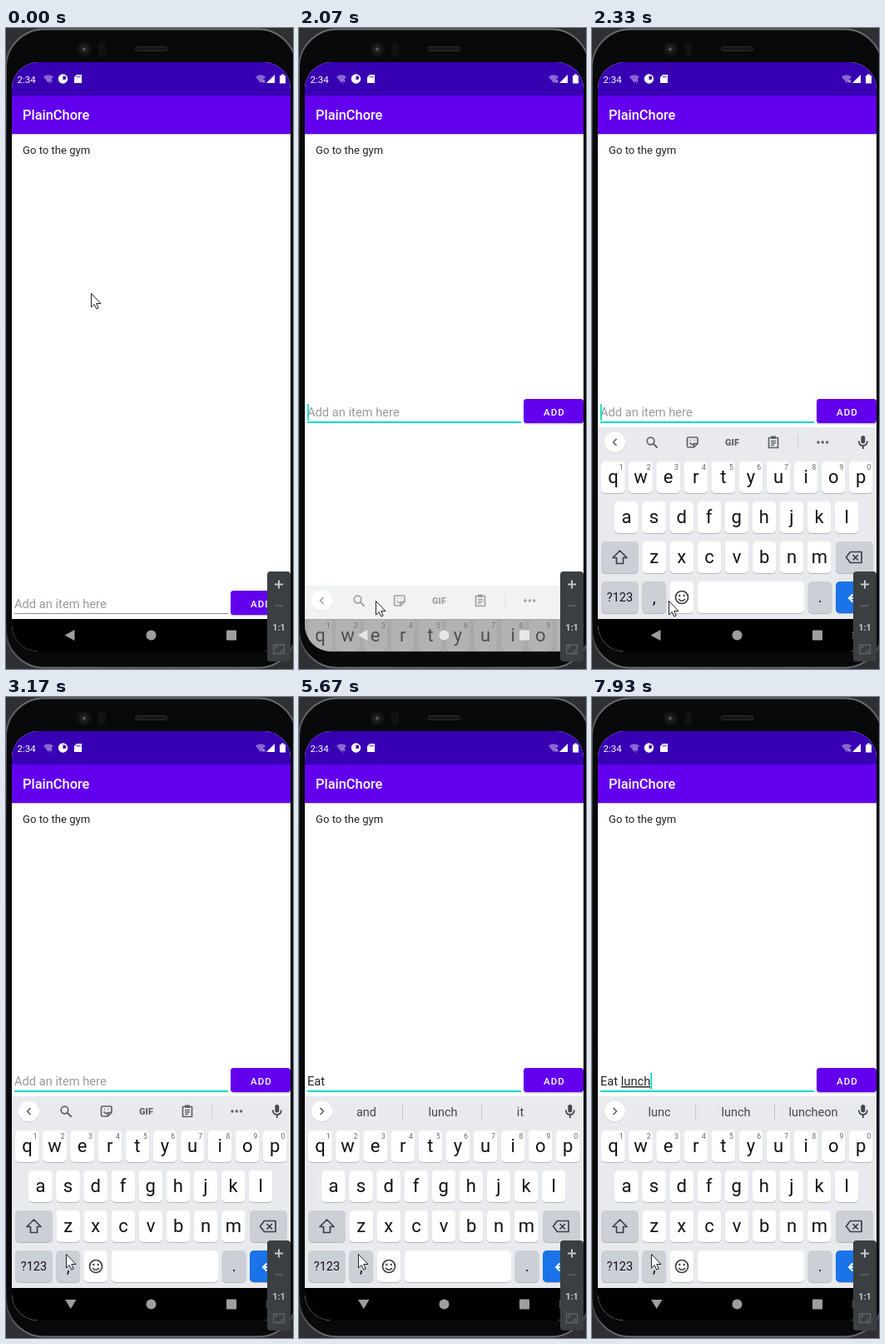
Recreate the animation shown at these times as an HTML page. Size 345 by 769 pixels, loop 8000 ms.

```html
<!DOCTYPE html>
<html lang="en">
<head>
<meta charset="utf-8">
<title>To-do list on a phone</title>
<style>
html, body { margin: 0; width: 100%; height: 100%; overflow: hidden; background: #2e3033; }
svg { display: block; width: 100%; height: 100%; }
text { font-family: Roboto, "Open Sans", sans-serif; white-space: pre; }
.mid { text-anchor: middle; }
.med { font-weight: 500; }
.line { fill: none; stroke: #5f6368; stroke-width: 1.7; stroke-linejoin: round; }
.dark { stroke: #3c4043; }
</style>
</head>
<body>
<svg viewBox="0 0 345 769">
  <defs>
    <clipPath id="screenClip"><rect x="7" y="41" width="335" height="707" rx="32"/></clipPath>
    <linearGradient id="rim" x2="0" y2="1">
      <stop offset="0" stop-color="#6c6e70"/>
      <stop offset=".06" stop-color="#55575a"/>
      <stop offset=".2" stop-color="#232425"/>
      <stop offset=".92" stop-color="#1c1d1e"/>
      <stop offset="1" stop-color="#6c6e70"/>
    </linearGradient>
  </defs>

  <!-- phone body, its right edge just past the stage -->
  <rect x="0" y="1.500" width="349" height="766" rx="46" fill="#08090a" stroke="url(#rim)" stroke-width="2"/>
  <circle cx="94" cy="25.500" r="9" fill="#111213"/>
  <circle cx="94" cy="25.500" r="5.500" fill="#1c1e20"/>
  <circle cx="94" cy="25.500" r="2" fill="#55595d"/>
  <rect x="111" y="17" width="9" height="17" rx="3" fill="#101112"/>
  <rect x="155.500" y="22.500" width="38" height="5" rx="2" fill="#161718" stroke="#2b2c2d"/>

  <g clip-path="url(#screenClip)">
    <rect x="7" y="41" width="335" height="707" fill="#fff"/>
    <rect x="7" y="127" width="335" height="1" fill="#c4c4c4"/>
    <rect x="7" y="81" width="335" height="46" fill="#6200ee"/>
    <rect x="7" y="41" width="335" height="40" fill="#3700b3"/>

    <!-- status bar -->
    <g fill="#fff">
      <text x="13.500" y="65.500" font-size="11.500">2:34</text>
      <path d="M45 58.500Q51 54 57 58.500L51 66Z" opacity=".4"/>
      <text x="52" y="66.500" font-size="7.500" opacity=".8">?</text>
      <circle cx="68.500" cy="61" r="5.700"/>
      <path d="M68.500 57.500h1.500a2 2 0 0 1 0 4.500h-1.500z" fill="#3700b3"/>
      <path d="M82 59l3-3h6v10h-9z"/>
      <path d="M85.500 57.500v2M87.300 57.500v2M89 57.500v2" stroke="#3700b3" stroke-width=".9"/>
      <path d="M300 58.500Q306 54 312 58.500L306 66Z" opacity=".4"/>
      <path d="M308 62.500l3 3m0-3l-3 3" stroke="#fff"/>
      <path d="M313 66l10-10v10z"/>
      <path d="M329 57h2v-1.500h3v1.500h2v9.500h-7z"/>
    </g>
    <text class="med" x="20" y="110" font-size="16.400" fill="#fff">PlainChore</text>
    <text x="20" y="151" font-size="13.100" fill="#222">Go to the gym</text>

    <!-- input row -->
    <g id="row">
      <rect id="rule" x="10"/>
      <text id="hint" x="10" y="696" font-size="14.700" fill="#999">Add an item here</text>
      <text x="10" y="696" font-size="14.700" fill="#222" id="entry"><tspan id="plain"></tspan><tspan id="draft" text-decoration="underline"></tspan></text>
      <rect id="caret" y="681" width="1.700" height="20" fill="#03dac5"/>
      <rect x="270" y="676" width="72" height="29.500" rx="3.500" fill="#000" opacity=".22"/>
      <rect x="270" y="675" width="72" height="29" rx="3.500" fill="#6200ee"/>
      <text class="med" x="294" y="694.500" font-size="11.500" letter-spacing="1" fill="#fff">ADD</text>
    </g>

    <!-- keyboard -->
    <g id="board">
      <rect x="7" y="479" width="335" height="290" fill="#e8eaed"/>
      <circle cx="27.500" cy="498" r="12.500" fill="#c9cbcf"/>
      <circle cx="27.500" cy="497" r="12.500" fill="#fff"/>
      <path id="chevron" class="line"/>
      <g id="tools">
        <g class="line">
          <circle cx="70.500" cy="495.500" r="4.300"/>
          <path d="M73.700 498.700l5 5" stroke-width="2"/>
          <path d="M116 491h9.500q1.500 0 1.500 1.500v6l-4.500 4.500h-6.500q-1.500 0-1.500-1.500v-9q0-1.500 1.500-1.500zM127 498.500h-4.500v4.500M117.500 497.500q2.500 3.500 5.500 1"/>
          <path d="M118 494.500h1M122.500 494.500h1"/>
          <path d="M212.500 491.500h11v12h-11zM215 495.500h6M215 498h6M215 500.500h4"/>
        </g>
        <rect x="215" y="489.500" width="6" height="3.500" fill="#5f6368"/>
        <text class="mid" x="168.500" y="501" font-size="11" font-weight="900" fill="#5f6368">GIF</text>
        <rect x="247" y="488" width="1" height="18" fill="#cfd1d4"/>
        <g fill="#5f6368"><circle cx="272" cy="497" r="1.700"/><circle cx="277.300" cy="497" r="1.700"/><circle cx="282.600" cy="497" r="1.700"/></g>
      </g>
      <g id="words">
        <path d="M124.500 488v19M219.500 488v19" stroke="#c6c8cc"/>
        <g class="mid" font-size="14.500" fill="#45484c">
          <text x="81" y="503"></text><text x="173" y="503"></text><text x="266" y="503"></text>
        </g>
      </g>
      <rect x="323.300" y="489" width="5" height="9.500" rx="2.500" fill="#45484c"/>
      <path class="line dark" d="M320.800 495.500q0 5.500 5 5.500t5-5.500M325.800 501v4"/>
      <g id="keys"></g>
      <g class="line dark">
        <path d="M33.500 627l8.500 8.500h-4.500v7h-8v-7h-4.500z"/>
        <path d="M310.500 628.500h13.500v13h-13.500l-5-6.500zM313.500 632l6.500 6.500m0-6.500l-6.500 6.500"/>
        <circle cx="108" cy="683" r="7.500"/>
        <path d="M104 685q4 4.500 8 0"/>
      </g>
      <circle cx="105.300" cy="681" r="1.200" fill="#3c4043"/>
      <circle cx="110.700" cy="681" r="1.200" fill="#3c4043"/>
      <path d="M323 684h-14m4.500-4.500l-4.500 4.500l4.500 4.500" fill="none" stroke="#fff" stroke-width="2"/>
    </g>

    <!-- navigation bar -->
    <rect id="navBar" x="7" y="709" width="335" height="39"/>
    <g id="navIcons">
      <path id="back"/>
      <circle cx="174.500" cy="728.500" r="6"/>
      <rect x="265" y="722.500" width="12" height="12" rx="1"/>
      <path id="switcher" d="M313 724.500h2v1.500h-2zM313 727.500h2v1.500h-2zM313 730.500h2v1.500h-2z"/>
    </g>
  </g>

  <!-- zoom panel -->
  <rect x="314" y="652" width="28" height="108" rx="4" fill="#3c3f41"/>
  <path d="M323 667.500h10M328 662.500v10" stroke="#c4c6c8" stroke-width="2"/>
  <path d="M323 693h10" stroke="#616365" stroke-width="1.500"/>
  <text class="mid" x="328" y="723" font-size="11" font-weight="700" fill="#c4c6c8">1:1</text>
  <path d="M321.500 740h13v10.500h-13zM324 745v-2.500h2.500M332 745.500v2.500h-2.500" fill="none" stroke="#616365" stroke-width="1.300"/>

  <path id="mouse" d="M.5.5V17L4.200 13.500L6.700 19L9.200 18L6.700 12.500H12Z" fill="#fff" stroke="#222" stroke-width="1"/>
</svg>
<script>
const LOOP = 8000;
const $ = id => document.getElementById(id);
const set = (id, attrs) => { for (const k in attrs) $(id).setAttribute(k, attrs[k]); };
const show = (id, on) => set(id, { visibility: on ? 'visible' : 'hidden' });
const at = (list, t) => list.filter(e => e[0] <= t).pop();

// time, pointer tip x, y
const pointer = [
  [0, 102, 318], [250, 93, 340], [370, 86, 358],
  [620, 84, 300], [740, 83, 225], [860, 91, 166], [980, 106, 245],
  [1100, 115, 400], [1220, 115, 545], [1340, 113, 613],
  [1460, 104, 655], [1580, 92, 687],
  [2690, 89, 682], [2810, 82, 675], [2930, 76, 670], [3050, 73, 667], [3170, 72, 668], [3410, 71, 668]
];

// time, committed text, underlined text, caret visible, suggestions
const next = 'and lunch it';
const typing = [
  [0, '', '', 0], [1830, '', '', 1], [2810, '', '', 0], [3290, '', '', 1], [3780, '', '', 0],
  [4310, 'E', '', 1], [4430, '', 'E', 1, 'E Eat Ex'], [4550, '', 'Ea', 1, 'Ea Eat Each'],
  [4800, '', 'Eat', 1, 'Ea Eat Each'], [4920, '', 'Eat ', 1, 'Eat Eating East'],
  [5170, 'Eat ', '', 1, next], [5670, 'Eat ', '', 0, next], [6170, 'Eat ', '', 1, next],
  [6290, 'Eat ', 'k', 1, 'k know I'], [6540, 'Eat ', 'ku', 1, 'k know I'], [6660, 'Eat ', 'ku', 1, 'ku kung Ku'],
  [6810, 'Eat ', 'k', 1, 'k know I'], [6930, 'Eat ', '', 1], [7050, 'Eat ', '', 1, next],
  [7300, 'Eat ', 'l', 1, 'l lunch lot'], [7420, 'Eat ', 'lu', 1, 'lu lunch lug'],
  [7560, 'Eat ', 'lun', 1, 'lu lunch lug'], [7680, 'Eat ', 'lun', 1, 'lun lunch lunar'],
  [7930, 'Eat ', 'lunch', 1, 'lunc lunch luncheon']
];

// time, keyboard drop in px, opacity
const slide = [[0, 300, 0], [2070, 190, .6], [2190, 86, .82], [2330, 0, 1]];

function key(x, y, label, { w = 28.8, fill = '#fff', size = 22, hint = '' } = {}) {
  const mid = x + w / 2;
  return `<rect x="${x}" y="${y + 1}" width="${w}" height="38" rx="5" fill="#b4b7bc"/>
    <rect x="${x}" y="${y}" width="${w}" height="38" rx="5" fill="${fill}"/>
    <text class="mid" x="${mid}" y="${y + 19 + size * .33}" font-size="${size}" fill="#111">${label}</text>
    <text class="mid" x="${mid + 9.7}" y="${y + 10}" font-size="8.5" fill="#5f6368">${hint}</text>`;
}

function buildKeys() {
  const pitch = 33.1, grey = '#cccfd6';
  const row = (letters, x, y, hints = '') =>
    [...letters].map((c, i) => key(x + i * pitch, y, c, { hint: hints[i] || '' })).join('');
  $('keys').innerHTML =
    row('qwertyuiop', 11, 520, '1234567890') +
    row('asdfghjkl', 27, 568) +
    row('zxcvbnm', 60.3, 616) +
    key(11, 616, '', { w: 45, fill: grey }) +
    key(293, 616, '', { w: 45, fill: grey }) +
    key(11, 664, '?123', { w: 45, fill: grey, size: 14.5 }) +
    key(60.3, 664, ',', { fill: grey, size: 20 }) +
    key(93.5, 664, '') +
    key(126.5, 664, '', { w: 128.5 }) +
    key(259.7, 664, '.', { fill: grey, size: 18 }) +
    key(293, 664, '', { w: 45, fill: '#1a73e8' });
}

function drawEntry(t) {
  const [, text, draft, caretOn, words] = at(typing, t);
  const focus = t >= 1830;
  set('row', { transform: `translate(0 ${t >= 2070 ? -230 : 0})` });
  set('rule', focus
    ? { y: 702, width: 257, height: 2, fill: '#03dac5' }
    : { y: 702, width: 257, height: 1, fill: '#8c8c8c' });
  $('plain').textContent = text;
  $('draft').textContent = draft;
  show('hint', !(text + draft));
  show('caret', caretOn);
  set('caret', { x: 10 + (text + draft ? $('entry').getComputedTextLength() : 0) });

  show('tools', !words);
  show('words', words);
  set('chevron', { d: words ? 'M25.500 493l4 4l-4 4' : 'M29.500 493l-4 4l4 4' });
  const list = (words || '  ').split(' ');
  document.querySelectorAll('#words text').forEach((el, i) => el.textContent = list[i]);
}

function drawSystem(t) {
  const [, drop, opacity] = at(slide, t);
  set('board', { transform: `translate(0 ${drop})`, opacity });
  const clear = t >= 2070 && t < 2330;
  set('navBar', { opacity: clear ? .3 : 1 });
  set('navIcons', { fill: clear ? '#e6e6e6' : '#9e9e9e' });
  set('back', { d: t >= 2450 ? 'M71 723h13.500l-6.700 11z' : 'M70.500 728.500l12-6.500v13z' });
  show('switcher', t >= 2330);
}

function draw(t) {
  drawEntry(t);
  drawSystem(t);
  const [, x, y] = at(pointer, t);
  set('mouse', { transform: `translate(${x} ${y})` });
}

function tick() {
  draw(performance.now() % LOOP);
  requestAnimationFrame(tick);
}

buildKeys();
tick();
</script>
</body>
</html>
```
